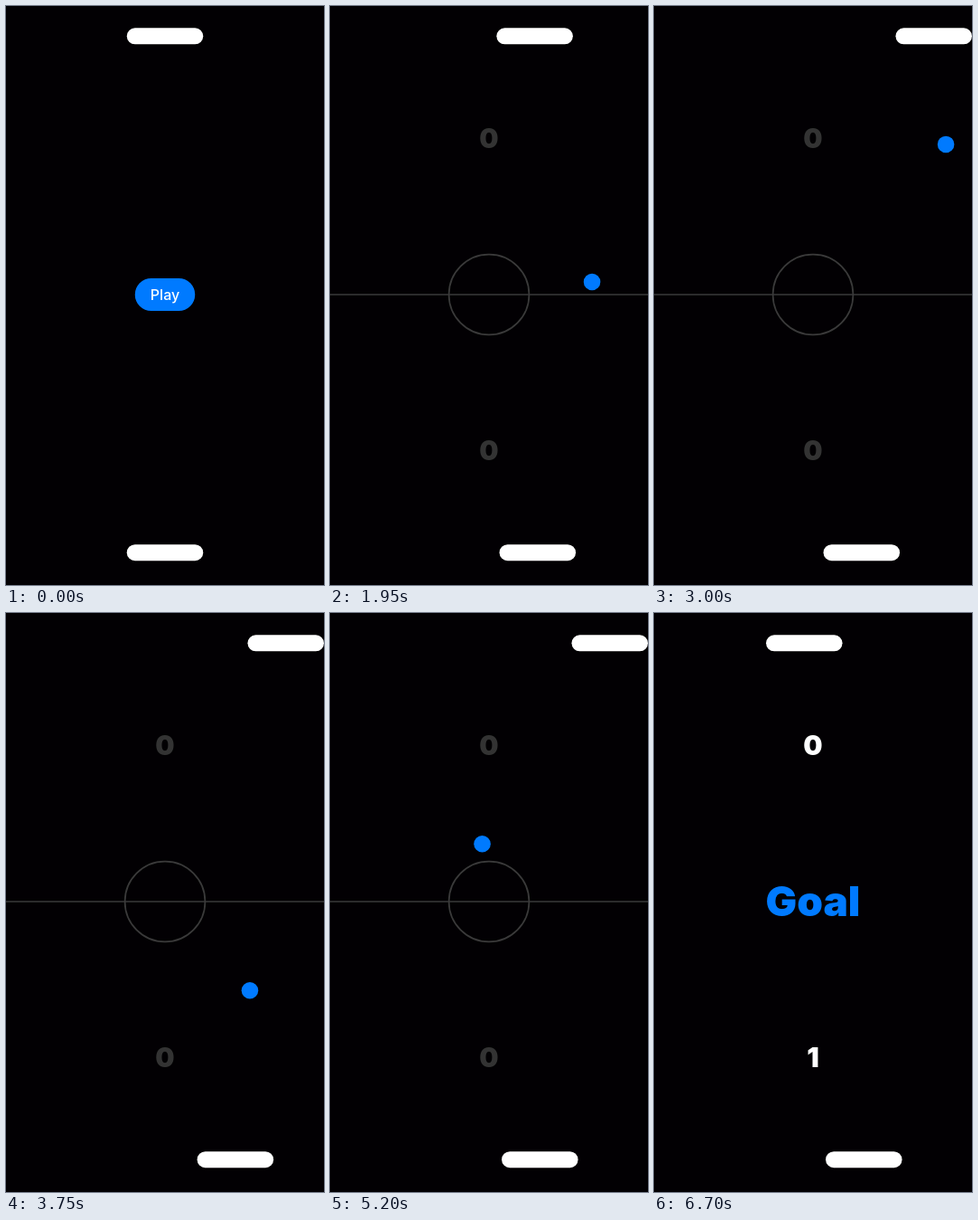
Animation of 352 by 640 pixels, one loop 6750 ms. Source, as an HTML page with a canvas:

```html
<!DOCTYPE html>
<html lang="en">
<head>
<meta charset="utf-8">
<title>Paddle game</title>
<style>
  html, body { margin: 0; height: 100%; overflow: hidden; background: #020003; }
  canvas { display: block; }
</style>
</head>
<body>
<canvas width="352" height="640"></canvas>
<script>
const ctx = document.querySelector('canvas').getContext('2d');
const LOOP = 6750, START = 350, GOAL = 6000;
const BACK = '#020003', WHITE = '#fff', BLUE = '#007aff', DIM = '#333', LINE = '#3a3a3a';
const CX = 176, CY = 319;

// The ball flies straight between kick-off, its bounces and the goal.
const bounces = [
  { t: 356, x: CX, y: CY },
  { t: 1122, x: 230.8, y: 586 },
  { t: 2706, x: 344, y: 49 },
  { t: 4230, x: 236, y: 586 },
  { t: GOAL, x: 113, y: -17 },
];

const progress = (t, from, to) => Math.min(1, Math.max(0, (t - from) / (to - from)));

function glide(t, from, to, distance) {
  const u = progress(t, from, to);
  return distance * u * u * (3 - 2 * u);
}

function ballAt(t) {
  const next = Math.max(1, bounces.findIndex(b => b.t > t));
  const a = bounces[next - 1], b = bounces[next];
  const u = progress(t, a.t, b.t);
  return [a.x + (b.x - a.x) * u, a.y + (b.y - a.y) * u];
}

const topPaddleX = t =>
  CX + glide(t, 1700, 2300, 133.7) + glide(t, 5250, 6064, -150.7) + glide(t, 6600, 6700, 7.3);

const bottomPaddleX = t =>
  CX + glide(t, 400, 850, 53.8) + glide(t, 3150, 4230, 2.5)
  - 65 * Math.sin(2 * Math.PI * progress(t, 3150, 4230));

function pill(x, y, w, h, color) {
  ctx.fillStyle = color;
  ctx.beginPath();
  ctx.roundRect(x - w / 2, y - h / 2, w, h, h / 2);
  ctx.fill();
}

function label(text, y, size, weight, color) {
  ctx.font = `${weight} ${size}px Inter, sans-serif`;
  ctx.textAlign = 'center';
  ctx.fillStyle = color;
  ctx.fillText(text, CX, y);
}

function scores(top, bottom, color) {
  label(top, 157, 30, 900, color);
  label(bottom, 502.3, 30, 900, color);
}

function court() {
  ctx.strokeStyle = LINE;
  ctx.lineWidth = 1.7;
  ctx.beginPath();
  ctx.moveTo(0, CY);
  ctx.lineTo(352, CY);
  ctx.moveTo(CX + 44.4, CY);
  ctx.arc(CX, CY, 44.4, 0, 2 * Math.PI);
  ctx.stroke();
}

function draw(t) {
  ctx.fillStyle = BACK;
  ctx.fillRect(0, 0, 352, 640);

  if (t < START) {
    pill(CX, CY, 66.5, 36, BLUE);
    label('Play', 324.5, 16, 500, WHITE);
  } else if (t < GOAL) {
    court();
    scores('0', '0', DIM);
    pill(...ballAt(t), 18.6, 18.6, BLUE);
  } else {
    scores('0', '1', WHITE);
    label('Goal', 335.3, 46, 900, BLUE);
  }

  pill(topPaddleX(t), 33.3, 84.5, 18, WHITE);
  pill(bottomPaddleX(t), 604.2, 84.5, 18, WHITE);
}

function frame() {
  draw(performance.now() % LOOP);
  requestAnimationFrame(frame);
}
frame();
</script>
</body>
</html>
```
